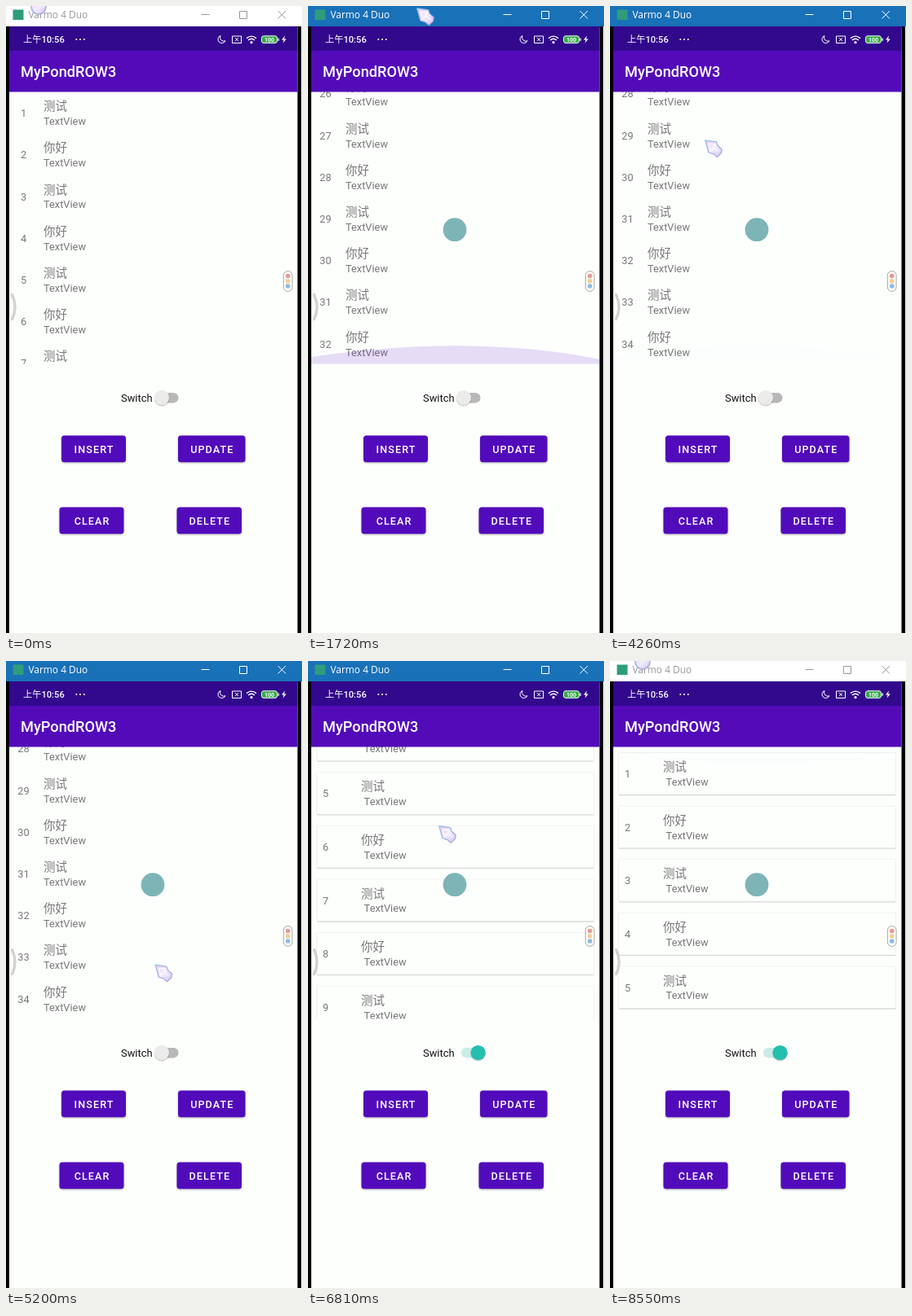
Animation, 363 px wide and 770 px high, one loop 8640 ms. Source, as an HTML page:

```html
<!DOCTYPE html>
<html lang="zh-CN">
<head>
<meta charset="utf-8">
<title>List demo</title>
<style>
  html, body { margin: 0; width: 100%; height: 100%; overflow: hidden; background: #000; }
  svg { display: block; }
  text { font-family: Roboto, "Noto Sans CJK SC", "Noto Sans CJK", sans-serif; white-space: pre; }
  .item { font-size: 12.8px; fill: #777; }
  .item .head { font-size: 14.5px; }
  .mid { text-anchor: middle; }
  .btn { filter: drop-shadow(0 1px 1px rgba(0, 0, 0, .3)); }
  .btn text { font-size: 12.6px; font-weight: 500; letter-spacing: 1.1px; fill: #fff; text-anchor: middle; }
  .line { fill: none; stroke: currentColor; }
  .window { font-family: "Open Sans", "Noto Sans", sans-serif; font-size: 11.9px; fill: currentColor; }
  #glow, #topGlow { fill: #5a0bc8; opacity: 0; }
</style>
</head>
<body>
<svg width="363" height="770" viewBox="0 0 363 770">
  <defs>
    <clipPath id="listArea"><rect x="4" y="105" width="353.5" height="334.5"/></clipPath>
    <linearGradient id="gem" x1="0" y1="0" x2="1" y2="1">
      <stop offset="0" stop-color="#f3c4ea"/>
      <stop offset=".5" stop-color="#f4ecfc"/>
      <stop offset="1" stop-color="#cfc4f6"/>
    </linearGradient>
    <linearGradient id="rim" x1="0" y1="0" x2="1" y2="1">
      <stop offset="0" stop-color="#8ccbe8"/>
      <stop offset="1" stop-color="#b39be0"/>
    </linearGradient>
  </defs>

  <rect x="4" y="26" width="353.5" height="744" fill="#fdfffd"/>
  <rect x="362" y="25" width="1" height="745" fill="#eee"/>

  <g clip-path="url(#listArea)">
    <g id="rows"></g>
    <g id="cards"></g>
    <path id="glow" d="M4 440V431Q200 402 358 434V440Z"/>
    <g transform="translate(0 545) scale(1 -1)">
      <path id="topGlow" d="M4 440V432Q181 402 358 432V440Z"/>
    </g>
  </g>

  <!-- status and app bars -->
  <rect x="4" y="25" width="353.5" height="30.5" fill="#32088c"/>
  <rect x="4" y="55" width="353.5" height="50.5" fill="#530bb9"/>
  <text x="18" y="87" font-size="18.2" font-weight="500" fill="#fff">MyPondROW3</text>
  <g fill="#fff" color="#fff">
    <text x="21" y="45.2" font-size="11.2" font-weight="500">上午10:56</text>
    <circle cx="86.3" cy="41" r="1"/><circle cx="91" cy="41" r="1"/><circle cx="95.8" cy="41" r="1"/>
    <path class="line" d="M263 36.5A4.7 4.7 0 1 0 269 42.8A4.6 4.6 0 0 1 263 36.5Z"/>
    <path class="line" d="M277.5 37h11v8.5h-11ZM281 39.2l4 4M285 39.2l-4 4"/>
    <path class="line" stroke-width="1.4" d="M295 39.6q6-5 12 0M297 42q4-3.4 8 0"/>
    <circle cx="301" cy="44.7" r="1.6"/>
    <rect x="313.5" y="36.8" width="19" height="8.6" rx="2.5" fill="#35a84b" stroke="#fff"/>
    <rect x="333.5" y="39.5" width="1.3" height="3.4"/>
    <text class="mid" x="323" y="43.7" font-size="7" font-weight="700">100</text>
    <path d="M342 36.6l-4 5h2.6l-1 4 4.2-5.2h-2.7Z"/>
  </g>

  <!-- controls -->
  <text x="141" y="486" font-size="12.9" fill="#111">Switch</text>
  <rect id="track" x="188" y="475" width="23.5" height="12.4" rx="6.2"/>
  <g id="thumb">
    <circle cx="191" cy="482" r="9.4" opacity=".18"/>
    <circle id="knob" cx="191" cy="481" r="9.1"/>
  </g>
  <g id="buttons"></g>

  <!-- floating overlays -->
  <path d="M7.500 354.5Q14.500 370 7.500 384.5" fill="none" stroke="#b9b4b4" stroke-opacity=".6" stroke-width="3.4" stroke-linecap="round"/>
  <rect x="340.3" y="325.5" width="10.8" height="25" rx="5.4" fill="#fbfbf7" stroke="#aaa99f"/>
  <circle cx="345.7" cy="331.5" r="2.8" fill="#e79a98"/>
  <circle cx="345.7" cy="337.8" r="2.8" fill="#f2cf98"/>
  <circle cx="345.7" cy="344" r="2.8" fill="#8bbbe6"/>
  <circle id="ball" cx="180" cy="274.7" r="14.4" fill="#7db5b7"/>

  <!-- window title bar -->
  <rect id="bar" width="363" height="25"/>
  <g id="barInk">
    <rect x="8.5" y="4.5" width="13" height="12.5" fill="#2f9c7c"/>
    <text class="window" x="27.5" y="15">Varmo 4 Duo</text>
    <path class="line" d="M239.5 10.5h10M286.5 6.5h9v9h-9ZM333.5 6l9.5 9.5M343 6l-9.5 9.5"/>
  </g>

  <circle id="busy" cx="40" cy="1" r="9" fill="url(#gem)" stroke="url(#rim)" stroke-width="1.6"/>
  <g id="cursor">
    <path d="M.8 1L14.5 2.8 16.2 7.6 21.2 12 20.4 16.6 15.4 21.4 10.6 17.6 5 16Z"
      fill="url(#gem)" stroke="url(#rim)" stroke-width="1.3" stroke-linejoin="round"/>
    <path d="M5 5l8 1-1.5 4.5 6 4M5 5l2.5 8 4-2.5" fill="none" stroke="#fff" stroke-width="1.3" opacity=".8"/>
  </g>
</svg>

<script>
const LOOP = 8640, FOCUS = 300, INSERT = 2950, TOGGLE = 5450, BLUR = 8460;
const SWIPE = 220, HOLD = 80;               // duration of a drag and the pause after it
const SLOP = 14, MIN_SPEED = .3;            // px, px per ms
const GLIDE = 200, FADE = 170;              // decay times of fling and edge glow
const ROW = 51.2, CARD = 65.6, VIEW = 334.7, COUNT = 34, ADDED = 2;

const $ = id => document.getElementById(id);
const set = (id, attrs) => Object.entries(attrs).forEach(([key, value]) => $(id).setAttribute(key, value));
const clamp = (v, lo = 0, hi = 1) => Math.min(hi, Math.max(lo, v));
const mix = (a, b, p) => a + (b - a) * p;
const fade = (from, to, p) => `rgb(${from.map((c, i) => mix(c, to[i], p))})`;

function item(i, y, indent, extra = '') {
  const x = 46 + indent;
  return `<g class="item" transform="translate(0 ${y})">${extra}
    <text class="mid" x="21.5" y="31.2">${i + 1}</text>
    <text class="head" x="${x}" y="23.2">${i % 2 ? '你好' : '测试'}</text>
    <text x="${x + indent * .19}" y="41">TextView</text></g>`;
}
const cardBox = `<rect x="10.5" y=".5" width="340" height="52" rx="1" fill="#fdfffd" stroke="#000" stroke-opacity=".05"/>
  <path d="M11 52.6H350.5" stroke="#000" stroke-opacity=".12" stroke-width="1.3"/>`;
for (let i = 0; i < COUNT; i++) {
  $('rows').innerHTML += item(i, 105 + i * ROW, 0);
  $('cards').innerHTML += item(i, 112 + i * CARD, 19, cardBox);
}

function button(label, x, y, w) {
  const box = `x="${x}" y="${y}" width="${w}" height="32.7" rx="3.5"`;
  $('buttons').innerHTML += `<g class="btn"><rect ${box} fill="#520bbb"/>
    <rect id="${label}" ${box} fill="#fff" opacity="0"/>
    <text x="${x + w / 2 + .6}" y="${y + 21.5}">${label}</text></g>`;
}
button('INSERT', 68, 527.5, 79);
button('UPDATE', 211, 527.5, 82.5);
button('CLEAR', 65.5, 615.5, 79);
button('DELETE', 209.5, 615.5, 79.5);

// The pointer's session: drags move the list, rests only place the pointer.
const stops = [], drags = [];
function rest(at, x, y, hold = HOLD) {
  stops.push({ at, x, y }, { at: at + hold, x, y });
}
function drag(at, x, from, to) {
  drags.push({ at, from, to });
  stops.push({ at, x, y: from });
  rest(at + SWIPE, x, to);
}
rest(0, 36, 3);
for (let i = 0; i < 4; i++) drag(FOCUS + i * 600, 133, 400, 2);
rest(INSERT - 50, 100, 540, 280);
rest(3290, 122, 405);
drag(3370, 122, 405, 5);
rest(4260, 116, 164);
rest(4430, 114, 5);
rest(TOGGLE - 50, 202, 478);
drag(5590, 188, 392, 130);
drag(5920, 188, 8, 392);
drag(6230, 188, 392, 130);
drag(6700, 160, 8, 392);
drag(7050, 151, 392, 359);
drag(7360, 151, 359, 250);
drag(7700, 145, 8, 392);
rest(BLUR - HOLD, 36, 3);

function pointerAt(t) {
  const i = stops.findIndex(s => s.at > t);
  if (i < 0) return stops[stops.length - 1];
  const a = stops[i - 1], b = stops[i], p = (t - a.at) / (b.at - a.at);
  return { x: mix(a.x, b.x, p), y: mix(a.y, b.y, p) };
}

// Follows each drag, its fling and the pull past either end.
function scrollAt(t, cards) {
  const list = drags.filter(d => d.at > TOGGLE === cards);
  let y = 0, pull = 0;
  list.forEach((d, i) => {
    if (t < d.at) return;
    const count = d.at > INSERT ? COUNT : COUNT - ADDED;
    const max = count * (cards ? CARD : ROW) - VIEW;
    const release = d.at + SWIPE, next = list[i + 1] ? list[i + 1].at : LOOP;
    const path = d.from - d.to, speed = path / SWIPE;
    const travel = Math.max(0, Math.abs(path) * clamp((t - d.at) / SWIPE) - SLOP);

    const wanted = y + Math.sign(path) * travel;
    y = clamp(wanted, 0, max);
    const over = (wanted - y) * Math.exp(-Math.max(0, t - release - HOLD) / FADE);
    if (Math.abs(over) > Math.abs(pull)) pull = over;

    if (Math.abs(speed) > MIN_SPEED) {
      const idle = Math.max(0, Math.min(t, next) - release);
      y = clamp(y + speed * GLIDE * (1 - Math.exp(-idle / GLIDE)), 0, max);
    }
  });
  return { y, pull };
}

function draw(t) {
  const active = t >= FOCUS && t < BLUR, cards = t >= TOGGLE;
  const waiting = t < 60 || t >= BLUR;
  const { y, pull } = scrollAt(t, cards), pointer = pointerAt(t);
  const on = clamp((t - TOGGLE) / 150);

  set('bar', { fill: active ? '#1971b8' : '#fff' });
  set('barInk', { color: active ? '#fff' : '#999' });
  set('ball', { opacity: +(t >= FOCUS) });
  set('busy', { opacity: +waiting });
  set('cursor', { opacity: +!waiting, transform: `translate(${pointer.x} ${pointer.y})` });

  set('rows', { opacity: +!cards, transform: `translate(0 ${-y})` });
  set('cards', { opacity: +cards, transform: `translate(0 ${-y})` });
  $('glow').style.opacity = .14 * clamp(pull / 300);
  $('topGlow').style.opacity = .14 * clamp(-pull / 300);

  set('thumb', { transform: `translate(${17.6 * on} 0)` });
  set('knob', { fill: fade([235, 235, 233], [36, 191, 173], on) });
  set('track', { fill: fade([184, 184, 184], [201, 236, 231], on) });
  set('INSERT', { opacity: t < INSERT ? 0 : .15 * clamp((3540 - t) / 170) });
}

const begin = performance.now();
function tick() {
  draw((performance.now() - begin) % LOOP);
  requestAnimationFrame(tick);
}
tick();
</script>
</body>
</html>
```
